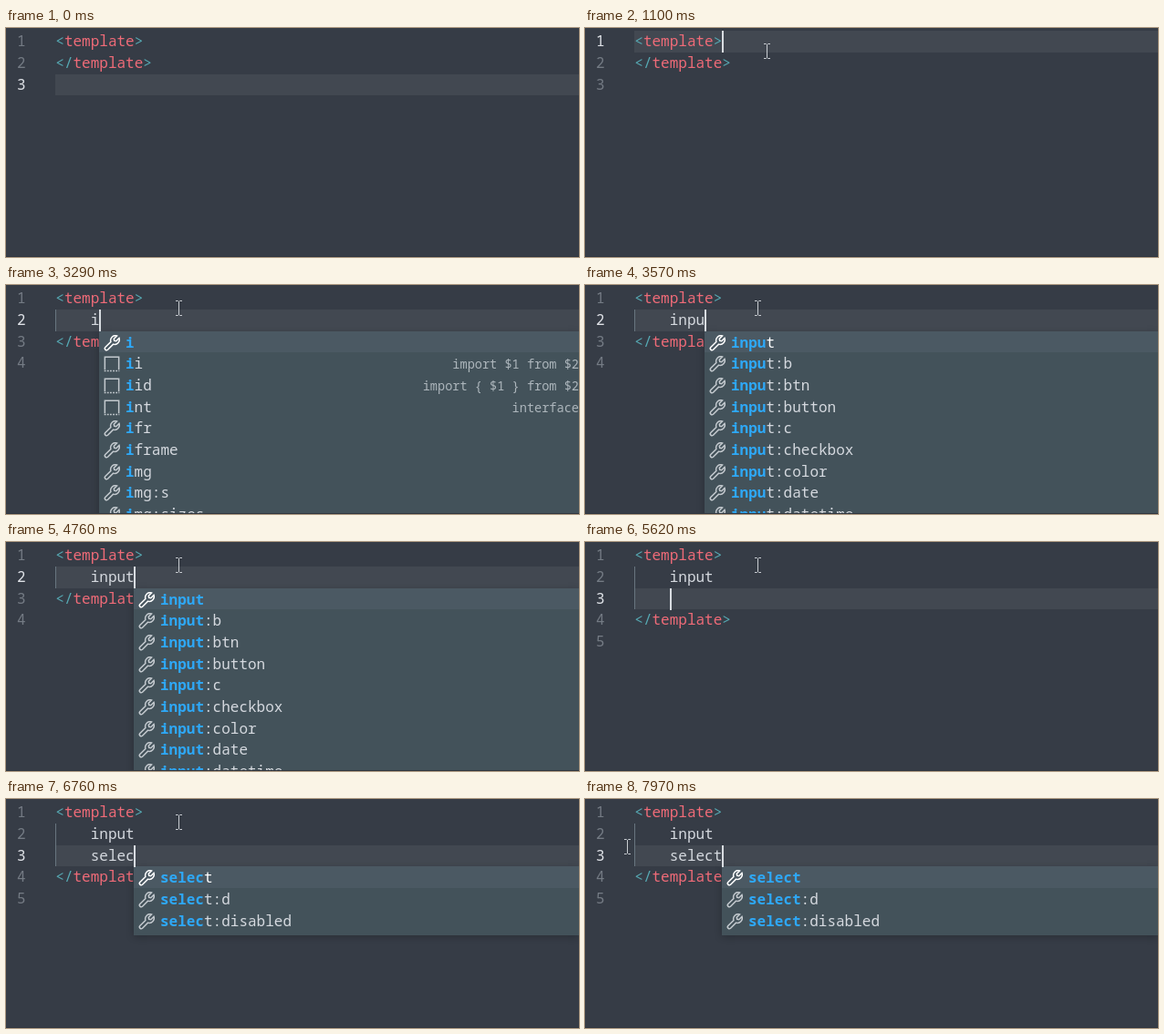
Animation of 628 by 252 pixels, one loop 8 s. Source, as an HTML page:

```html
<!DOCTYPE html>
<html lang="en">
<head>
<meta charset="utf-8">
<title>Tag completion in an editor</title>
<style>
  html, body { margin: 0; width: 100%; height: 100%; overflow: hidden; background: #363c46; }
  #stage {
    position: relative; width: 628px; height: 252px; overflow: hidden;
    background: #363c46; color: #d5d9df;
    font: 500 16px/23.68px "Noto Sans Mono", "DejaVu Sans Mono", monospace;
    white-space: pre;
  }
  #stage::after { content: ""; position: absolute; left: 0; top: 251px; width: 628px; height: 1px; background: #30363f; }
  #view > *, #pointer { position: absolute; }
  .band { left: 54px; width: 574px; height: 23.68px; background: #424851; }
  .num { left: 12px; color: #747b84; }
  .num.on { color: #e0e3e8; }
  .code { left: 54.3px; }
  .punct { color: #56a9b3; }
  .tag { color: #ef6b78; }
  .guide { left: 54px; width: 1px; background: #68757f; }
  .caret { width: 2px; height: 24px; background: #d8dce1; }
  .list { right: 0; padding-bottom: 4.5px; background: #43525a; box-shadow: 0 2px 8px rgba(0, 0, 0, .22); }
  .item { position: relative; height: 23.68px; line-height: 25.68px; padding-left: 29px; }
  .item:first-child { background: #4b5963; color: #fff; }
  .item svg { position: absolute; left: 4.6px; top: 4px; width: 18px; height: 18px; fill: none; stroke: #c3c9ce; stroke-width: 1.35; }
  .item:first-child svg { stroke: #fff; }
  .item b { color: #2ea8f7; }
  .item small { position: absolute; right: 0; top: 0; font-size: 13.6px; color: #adb6bc; }
  #pointer { left: -4px; top: -8px; width: 8px; height: 17px; fill: none; stroke: #c9cdd2; }
</style>
</head>
<body>
<div id="stage">
  <div id="view"></div>
  <svg id="pointer" viewBox="0 0 8 17"><path d="M1 .5H3.5L4.5 1.5L5.5 .5H8M4.5 1V16M1 16.5H3.5L4.5 15.5L5.5 16.5H8"/></svg>
</div>
<script>
const LOOP = 8000, CHAR = 9.57, ROW = 23.68, LEFT = 54.3, TOP = 3.4;
const view = document.getElementById('view');
const pointer = document.getElementById('pointer');

const WRENCH = '<path d="M1.6 12L7 6.6A4.6 4.6 0 0 1 12.9 .9L10 3.8L10.4 5.6L12.2 6L15.1 3.1A4.6 4.6 0 0 1 9.4 9L4 14.4A1.7 1.7 0 0 1 1.6 12Z"/>';
const SNIPPET = '<path d="M1.2 13.5V1.2H14.8V13.5"/><path d="M.6 14.6H15.4" stroke-dasharray="1.6 1.2"/>';
const details = { ii: 'import $1 from $2', iid: 'import { $1 } from $2', int: 'interface' };

const inputs = ['input', ...'b btn button c checkbox color date datetime'.split(' ').map(s => 'input:' + s)];
const selects = ['select', 'select:d', 'select:disabled'];
const lists = {
  i: 'i ii iid int ifr iframe img img:s img:sizes'.split(' '),
  in: ['int', 'inp', ...inputs],
  inp: ['inp', ...inputs],
  inpu: inputs,
  input: inputs,
  s: ['s', 'samp', 'script', 'script:src', 'sect', 'section', ...selects],
  se: ['sect', 'section', ...selects],
  sel: selects, sele: selects, selec: selects, select: selects
};

// time, lines inside the template, active row, caret column (-1: hidden), popup open
const steps = [
  [0, [], 2, -1],
  [970, [], 0, 10],
  [1500, [], 0, -1],
  [1770, [''], 1, 4],
  [2300, [''], 1, -1],
  [2760, [''], 1, 4],
  [3220, ['i'], 1, 5],
  [3290, ['i'], 1, 5, true],
  [3360, ['in'], 1, 6, true],
  [3500, ['inp'], 1, 7, true],
  [3570, ['inpu'], 1, 8, true],
  [3770, ['input'], 1, 9, true],
  [4230, ['input'], 1, -1, true],
  [4760, ['input'], 1, 9, true],
  [4900, ['input'], 1, 9],
  [5300, ['input'], 1, -1],
  [5620, ['input', ''], 2, 4],
  [5960, ['input', 's'], 2, 5, true],
  [6220, ['input', 'se'], 2, 6, true],
  [6350, ['input', 'sel'], 2, 7, true],
  [6490, ['input', 'sele'], 2, 8, true],
  [6760, ['input', 'selec'], 2, 9, true],
  [6890, ['input', 'select'], 2, 10, true],
  [7350, ['input', 'select'], 2, -1, true],
  [7840, ['input', 'select'], 2, 10, true]
];

// time, x, y
const moves = [
  [0, -50, -50], [200, 434, 236], [270, 382, 204], [340, 300, 144], [410, 218, 82],
  [480, 192, 52], [550, 200, 32], [620, 215, 25], [890, 209, 25], [960, 203, 25],
  [1030, 200, 25], [1100, 199, 25], [1770, 189, 25],
  [7840, 150, 30], [7905, 84, 43], [7970, 46, 52]
];

const at = (table, t) => table.findLast(entry => entry[0] <= t);
const rowY = row => TOP + row * ROW;
const colX = col => Math.round(LEFT + col * CHAR);
const box = (cls, style, html = '') => `<div class="${cls}" style="${style}">${html}</div>`;
const tag = open => `<span class="punct">${open}</span><span class="tag">template</span><span class="punct">&gt;</span>`;

function popup(word, row) {
  const items = lists[word].map(name => {
    const info = details[name];
    return `<div class="item"><svg viewBox="0 0 16 16">${info ? SNIPPET : WRENCH}</svg>` +
      `<b>${word}</b>${name.slice(word.length)}${info ? `<small>${info}</small>` : ''}</div>`;
  });
  return box('list', `left:${colX(4 + word.length)}px;top:${rowY(row + 1)}px`, items.join(''));
}

function draw([, body, row, col, open]) {
  const lines = [tag('&lt;'), ...body.map(s => '    ' + s), tag('&lt;/'), ''];
  let html = box('band', `top:${rowY(row)}px`);
  lines.forEach((line, i) => {
    const top = `top:${rowY(i)}px`;
    html += box(i === row ? 'num on' : 'num', top, i + 1) + box('code', top, line);
  });
  if (body[0]) html += box('guide', `top:${rowY(1)}px;height:${body.length * ROW}px`);
  if (open) html += popup(body[row - 1], row);
  if (col >= 0) html += box('caret', `left:${colX(col)}px;top:${Math.round(rowY(row))}px`);
  view.innerHTML = html;
}

let shown;
function tick() {
  const t = performance.now() % LOOP;
  const step = at(steps, t);
  if (step !== shown) draw(shown = step);
  const [, x, y] = at(moves, t);
  pointer.style.transform = `translate(${x}px, ${y}px)`;
  requestAnimationFrame(tick);
}
tick();
</script>
</body>
</html>
```
